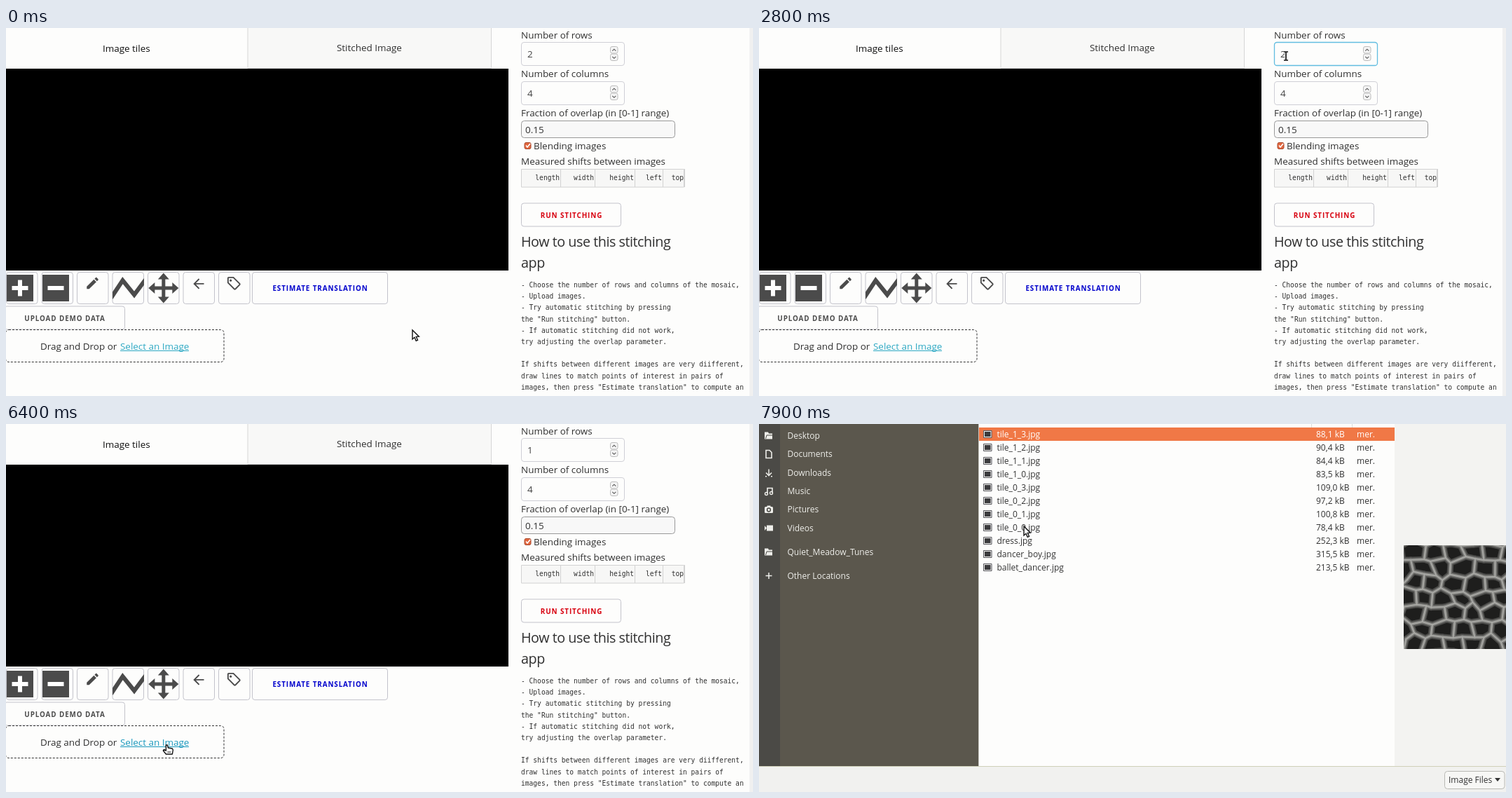
An HTML page with a canvas for the animation above (8000 ms loop, 1066 by 525 pixels).

```html
<!DOCTYPE html>
<html lang="en">
<head>
<meta charset="utf-8">
<title>Stitching app</title>
<style>
html, body { margin: 0; width: 100%; height: 100%; overflow: hidden; background: #fdfdfc; }
canvas { display: block; }
</style>
</head>
<body>
<canvas id="stage" width="1066" height="525"></canvas>
<script>
const LOOP = 8000, W = 1066, H = 525, DLG_TOP = -86;
const SANS = '"Open Sans", "Noto Sans", sans-serif';
const MONO = '"DejaVu Sans Mono", monospace';
const INK = '#303030', LINE = '#c3c3cb';
const stage = document.getElementById('stage').getContext('2d');
let c = stage;

// y is the middle of the capitals
function text(str, x, y, { size = 13.45, color = INK, weight = 400, font = SANS, align = 'left', gap = 0 } = {}) {
  c.font = `${weight} ${size}px ${font}`;
  c.letterSpacing = gap + 'px';
  c.textAlign = align;
  c.fillStyle = color;
  c.fillText(str, x, y + size * 0.36);
}
function rect(x, y, w, h, color) {
  c.fillStyle = color;
  c.fillRect(x, y, w, h);
}
function box(x, y, w, h, r, fill, stroke, width = 1) {
  c.beginPath();
  c.roundRect(x, y, w, h, r);
  if (fill) { c.fillStyle = fill; c.fill(); }
  if (stroke) { c.strokeStyle = stroke; c.lineWidth = width; c.stroke(); }
}
function lines(pts, color, width = 1, close = false, fill = null) {
  c.beginPath();
  pts.forEach(([x, y], i) => i ? c.lineTo(x, y) : c.moveTo(x, y));
  if (close) c.closePath();
  if (fill) { c.fillStyle = fill; c.fill(); }
  if (color) { c.strokeStyle = color; c.lineWidth = width; c.stroke(); }
}
function at(x, y, scale, draw) {
  c.save();
  c.translate(x, y);
  c.scale(scale, scale);
  draw();
  c.restore();
}
function disc(x, y, r, fill, stroke, width = 1) {
  c.beginPath();
  c.arc(x, y, r, 0, 7);
  if (fill) { c.fillStyle = fill; c.fill(); }
  if (stroke) { c.strokeStyle = stroke; c.lineWidth = width; c.stroke(); }
}

const PENCIL = new Path2D('M3 17.25V21h3.75L17.81 9.94l-3.75-3.75L3 17.25zM20.71 7.04c.39-.39.39-1.02 0-1.41l-2.34-2.34c-.39-.39-1.02-.39-1.41 0l-1.83 1.83 3.75 3.75 1.83-1.83z');
const BACK = new Path2D('M20 11H7.83l5.59-5.59L12 4l-8 8 8 8 1.41-1.41L7.83 13H20z');
const TAG = new Path2D('M3 4v7l9.5 9.5q.7.5 1.4 0l6.6-6.6q.5-.7 0-1.4L11 3H4q-1 0-1 1z');

function toolbar() {
  const dark = '#4b4b4b';
  for (let i = 0; i < 7; i++) box(0.5 + i * 50.5, 348.5, 44.5, 45, 3.6, '#fdfdfc', LINE);
  rect(1, 352, 38, 38, dark);
  rect(52, 352, 38, 38, dark);
  rect(8.5, 368, 23, 6, '#fff');
  rect(17, 359.5, 6, 23, '#fff');
  rect(59.5, 368, 23, 6, '#fff');
  c.fillStyle = dark;
  at(112.5, 353, 0.92, () => c.fill(PENCIL));
  at(263.5, 353.5, 0.95, () => c.fill(BACK));
  at(314, 353, 0.95, () => {
    c.strokeStyle = dark; c.lineWidth = 2; c.stroke(TAG);
    disc(7, 7.5, 1.6, dark);
  });
  c.save();
  c.beginPath(); c.rect(152, 349, 45, 44); c.clip();
  lines([[150, 385], [166.5, 360], [183, 380.5], [199, 359]], dark, 6);
  c.restore();
  // four-way arrow
  for (let i = 0; i < 4; i++) {
    c.save();
    c.translate(224.8, 371);
    c.rotate(i * Math.PI / 2);
    rect(-2.5, -16, 5, 16, dark);
    lines([[0, -21.5], [8, -12.5], [-8, -12.5]], null, 0, true, dark);
    c.restore();
  }
}
function button(label, x, y, w, h, color) {
  box(x, y, w, h, 3.6, '#fdfdfc', LINE);
  text(label, x + w / 2 + 0.5, y + h / 2 + 0.5, { size: 9.87, weight: 700, gap: 0.9, color, align: 'center' });
}
function numberField(value, y, focused) {
  box(735.5, y, 147, 33, 3.6, '#fdfdfc', focused ? '#62bde0' : '#cfcfd6', focused ? 1.3 : 1);
  text(value, 744, y + 17, { color: '#444' });
  for (const d of [0, 1]) {
    const top = y + 6 + d * 10.5, mid = top + 5;
    box(862.5, top, 10.5, 9.5, 2.5, '#f4f4f4', '#bcbcbc');
    const s = d ? -1 : 1;
    lines([[865.3, mid + s * 1.2], [867.8, mid - s * 1.3], [870.3, mid + s * 1.2]], '#555', 1.1);
  }
}

const HELP = [
  '- Choose the number of rows and columns of the mosaic,', '- Upload images.',
  '- Try automatic stitching by pressing', 'the "Run stitching" button.',
  '- If automatic stitching did not work,', 'try adjusting the overlap parameter.', '',
  'If shifts between different images are very diifferent,',
  'draw lines to match points of interest in pairs of',
  'images, then press "Estimate translation" to compute an'
];

function page(t) {
  rect(0, 0, W, H, '#fdfdfc');
  rect(1061, 0, 5, H, '#f0f0f0');

  rect(345, 0, 347, 57, '#f8f8f7');
  lines([[345, 0], [345, 57.5], [692.5, 57.5], [692.5, 0]], '#d6d6d6');
  text('Image tiles', 138, 29.5, { color: '#111' });
  text('Stitched Image', 472, 28.5);
  rect(0, 58, 717, 288, '#000');
  toolbar();
  button('ESTIMATE TRANSLATION', 351.5, 348.5, 193, 45, '#0000cc');
  button('UPLOAD DEMO DATA', -2.5, 397, 172, 33, '#4c4c4c');

  c.setLineDash([3, 2]);
  box(-0.5, 430.5, 311.5, 46, 4.5, '#fdfdfc', '#333');
  c.setLineDash([]);
  const link = t > 5750 ? '#1a98bd' : '#2ea9c4';
  text('Drag and Drop or', 49, 454);
  text('Select an Image', 163, 454, { color: link });
  rect(163, 460, 98, 1, link);

  const focused = t >= 2100 && t < 6200;
  text('Number of rows', 735, 10);
  numberField(t < 3000 ? '2' : '1', 20.5, focused);
  if (focused && (t - 2100) % 1200 < 650) rect(752, 28, 1.2, 18, '#111');
  text('Number of columns', 735, 65.5);
  numberField('4', 76.5, false);
  text('Fraction of overlap (in [0-1] range)', 735, 121.5);
  box(735.5, 132.5, 219, 24, 4, '#f8f8f8', '#999');
  text('0.15', 741, 145);

  box(740, 163.5, 9, 9, 2, '#e2673f', '#a8492c');
  lines([[742, 167.5], [744, 170], [748, 165]], '#fff', 1.6);
  text('Blending images', 753, 168.5);
  text('Measured shifts between images', 735, 190);

  rect(735, 201, 233, 26, '#f7f7f6');
  box(735.5, 201.5, 232, 25.5, 0, null, '#d2d2d2');
  [['length', 791], ['width', 840], ['height', 897], ['left', 937], ['top', 968]].forEach(([s, x]) => {
    lines([[x + 0.5, 201], [x + 0.5, 227]], '#d2d2d2');
    text(s, x - 1, 214, { size: 9.6, font: MONO, align: 'right' });
  });

  button('RUN STITCHING', 735.5, 250, 142, 33, '#d8000f');
  const head = { size: 19.73, gap: -0.45 };
  text('How to use this stitching', 735, 304.5, head);
  text('app', 735, 334.5, head);
  HELP.forEach((s, i) => text(s, 735, 366.5 + i * 16.22, { size: 9.6, font: MONO }));
}

function sideIcon(kind, y) {
  const ink = '#eeeeea';
  at(14, y, 1, () => {
    if (kind === 'folder') {
      lines([[-6, -5], [-1, -5], [0, -3], [5, -3], [5, 5], [-6, 5]], null, 0, true, ink);
      lines([[-4.5, 4.5], [-3, -0.5], [6, -0.5]], '#4b4a46');
    } else if (kind === 'clock') {
      disc(0, 0, 5, null, ink, 1.5);
      lines([[0, -3], [0, 0], [2.5, 0]], ink, 1.2);
    } else if (kind === 'home') home(ink);
    else if (kind === 'file') lines([[-4, -5.5], [1, -5.5], [4, -2.5], [4, 5.5], [-4, 5.5]], ink, 1.6, true);
    else if (kind === 'down') {
      lines([[0, -5], [0, 3]], ink, 1.5);
      lines([[-4, 0], [0, 4], [4, 0]], ink, 1.6);
      rect(-5, 4.5, 2, 1.5, ink); rect(3, 4.5, 2, 1.5, ink);
    } else if (kind === 'music') {
      lines([[-2, 3], [-2, -4.5], [5, -4.5], [5, 2]], ink, 1.6);
      disc(-3.5, 3.5, 2, null, ink, 1.4); disc(3.5, 2.5, 2, null, ink, 1.4);
    } else if (kind === 'camera') {
      box(-6, -4, 12, 9, 1.5, ink); rect(-2.5, -5.5, 5, 2, ink);
      disc(0, 0.5, 2.4, ink, '#4b4a46', 1.5);
    } else if (kind === 'video') {
      rect(-3, -4, 9, 8, ink);
      lines([[-6, -3.5], [-3, 0], [-6, 3.5]], null, 0, true, ink);
    } else {
      rect(-4.5, -0.75, 9, 1.5, ink); rect(-0.75, -4.5, 1.5, 9, ink);
    }
  });
}
function home(ink) {
  lines([[-6, 0], [0, -5.5], [6, 0]], ink, 1.6);
  lines([[-4, 0], [-4, 5], [-1, 5], [-1, 2], [1, 2], [1, 5], [4, 5], [4, 0], [0, -3.5]], null, 0, true, ink);
}

// Porous foam: a pale, uneven honeycomb over dark holes
function foam(x, y, w, h) {
  let seed = 11;
  const rnd = () => (seed = seed * 16807 % 2147483647) / 2147483647;
  const cols = 12, rows = 8, nodes = [];
  for (let r = 0; r < rows; r++) for (let k = 0; k < cols; k++) {
    nodes.push([x + k * 14 - 4 + rnd() * 9, y + r * 22 - 6 + rnd() * 10 + ((r + k) % 2 ? -3 : 3)]);
  }
  c.save();
  c.beginPath(); c.rect(x, y, w, h); c.clip();
  rect(x, y, w, h, '#1e1e1d');
  c.lineCap = 'round';
  for (const [color, width] of [['#4c4c4a', 9], ['#7d7d7a', 5], ['#a9a9a5', 1.8]]) {
    nodes.forEach((node, i) => {
      const r = Math.floor(i / cols), k = i % cols;
      if (k < cols - 1) lines([node, nodes[i + 1]], color, width);
      if ((r + k) % 2 === 0 && r < rows - 1) lines([node, nodes[i + cols]], color, width);
    });
  }
  c.restore();
}

const PLACES = [
  ['Recent', 'clock', -37], ['Home', 'home', -10], ['Desktop', 'folder', 16.5], ['Documents', 'file', 43],
  ['Downloads', 'down', 69.5], ['Music', 'music', 96], ['Pictures', 'camera', 122], ['Videos', 'video', 148.5],
  ['Quiet_Meadow_Tunes', 'folder', 182.5], ['Other Locations', 'plus', 216.5]
];
const FILES = [
  ['tile_1_3', '88,1'], ['tile_1_2', '90,4'], ['tile_1_1', '84,4'], ['tile_1_0', '83,5'],
  ['tile_0_3', '109,0'], ['tile_0_2', '97,2'], ['tile_0_1', '100,8'], ['tile_0_0', '78,4'],
  ['dress', '252,3'], ['dancer_boy', '315,5'], ['ballet_dancer', '213,5']
];

function makeDialog() {
  const layer = document.createElement('canvas');
  layer.width = W;
  layer.height = H - DLG_TOP;
  c = layer.getContext('2d');
  c.translate(0, -DLG_TOP);
  const small = { size: 12, color: '#333' }, pale = { size: 12, color: '#eeeeea' };

  rect(0, DLG_TOP, W, H - DLG_TOP, '#f3f3f1');
  const g = c.createLinearGradient(0, DLG_TOP, 0, -53);
  g.addColorStop(0, '#4b4a45'); g.addColorStop(1, '#383733');
  rect(0, DLG_TOP, W, 33, g);
  text('Cancel', 11, -69, pale);
  text('File Upload', 534, -69, { ...pale, weight: 700, align: 'center' });
  disc(991, -71, 4, null, '#eee', 1.5);
  lines([[994, -68], [998, -63]], '#eee', 1.8);
  box(1014, -82, 49, 26, 4, '#35ad58', '#2b8f48');
  text('Open', 1038.5, -69, { ...pale, align: 'center' });

  rect(0, -53, 30, 541, '#4b4a46');
  rect(30, -53, 283, 541, '#5b574d');
  for (const [name, icon, y] of PLACES) {
    sideIcon(icon, y);
    text(name, 40.5, y, pale);
  }

  // path bar
  box(318, -50, 358, 27, 4, '#f0f0ee', '#c4c4c0');
  rect(601, -49, 55, 25, '#d5d5d1');
  for (const x of [341, 403, 460, 512, 600, 656]) rect(x, -50, 1, 27, '#c8c8c4');
  lines([[330, -41], [325.5, -37], [330, -33]], null, 0, true, '#444');
  lines([[664, -41], [668.5, -37], [664, -33]], null, 0, true, '#888');
  at(352, -37, 1, () => home('#3b3b3b'));
  [['lena', 379.5], ['travail', 434], ['plotly', 488], ['dash-canvas', 557], ['assets', 628]]
    .forEach(([s, x]) => text(s, x, -37, { ...small, align: 'center' }));

  rect(314, -19, 593, 507, '#fdfdfc');
  rect(313, -53, 1, 541, '#c9c7c0');
  rect(788, -19, 1, 24, '#dcdcd8');
  rect(846, -19, 1, 24, '#dcdcd8');
  text('Name', 319, -7, small);
  text('Size', 795, -7, small);
  text('Modified', 852, -7, small);
  lines([[773, -9], [781, -9], [777, -5]], null, 0, true, '#555');
  rect(314, 5, 593, 19, '#f07846');
  FILES.forEach(([name, kb], i) => {
    const y = 15 + i * 19, style = i ? small : { ...small, color: '#fff' };
    box(320.5, y - 5.5, 11.5, 10, 0, '#f4f4f2', '#55555a');
    rect(322, y - 4, 8.5, 7, '#3a3a3c');
    text(name + '.jpg', 339.5, y, style);
    text(kb + ' kB', 795, y, style);
    text('mer.', 853, y, style);
  });

  text('tile_1_3.jpg', 993.5, -12, { ...small, align: 'center' });
  foam(920, 173, 146, 148);
  rect(0, 488, W, 37, '#f1f1ef');
  rect(0, 488, W, 1, '#cfd0b8');
  box(978.5, 495.5, 85.5, 25, 4, '#f7f7f5', '#b9b9b4');
  text('Image Files', 984, 508, small);
  lines([[1050, 505], [1058, 505], [1054, 510]], null, 0, true, '#333');
  c = stage;
  return layer;
}

const dialog = makeDialog();

// Shadow around the window only, so that its see-through inside stays clean
function shadow(top, height) {
  c.save();
  c.beginPath();
  c.rect(0, 0, W, H);
  c.rect(0, top, W, height);
  c.clip('evenodd');
  c.shadowColor = 'rgba(0,0,0,.5)';
  c.shadowBlur = 14;
  c.shadowOffsetY = 2;
  rect(-20, top, W + 40, height, '#000');
  c.restore();
}

// The window unfolds vertically about its middle while fading in
function showDialog(t) {
  const p = Math.min((t - 6406) / 250, 1);
  if (p <= 0) return;
  const s = 1 - (1 - p) * (1 - p), mid = 224;
  const top = mid + (DLG_TOP - mid) * s, height = dialog.height * s;
  c.save();
  c.globalAlpha = s;
  if (p < 1) shadow(top, height);
  c.drawImage(dialog, 0, top, W, height);
  c.restore();
}

const MOVES = [
  [0, 580, 431], [900, 580, 431], [1700, 787, 41], [2100, 787, 41], [2500, 752, 40], [3400, 752, 40],
  [3900, 746, 71], [4300, 738, 100], [5800, 231, 458], [6800, 230, 458], [7700, 378, 146], [LOOP, 378, 146]
];
function pointer(t) {
  const i = MOVES.findIndex(m => m[0] > t);
  const [t0, x0, y0] = MOVES[i - 1], [t1, x1, y1] = MOVES[i];
  const u = (t - t0) / (t1 - t0), e = u * u * (3 - 2 * u);
  return [x0 + (x1 - x0) * e, y0 + (y1 - y0) * e];
}
function cursor(t) {
  const [x, y] = pointer(t);
  const open = t > 6406;
  const inField = !open && x > 735 && x < 883 && ((y > 20 && y < 54) || (y > 76 && y < 110));
  const onLink = !open && x > 163 && x < 261 && y > 446 && y < 465;
  at(x, y, 1, () => {
    if (inField) {
      const bar = [[-3, -6], [3, -6], [0, -6], [0, 6], [-3, 6], [3, 6]];
      lines(bar, '#fff', 4);
      lines(bar, '#111', 1.7);
    } else if (onLink) {
      c.lineJoin = 'round';
      lines([[-2, 0], [0, 0], [1, 4], [7, 5], [8, 7], [7, 13], [-2, 13], [-6, 8], [-5, 6.5], [-2, 8]], '#111', 1.4, true, '#fff');
      lines([[0, 10], [5, 10]], '#111', 1);
      c.lineJoin = 'miter';
    } else {
      lines([[0, 0], [0, 13], [3, 10.3], [5.2, 15.3], [7.5, 14.3], [5.3, 9.4], [9.3, 9.2]], '#111', 1.4, true, '#fff');
    }
  });
}

function frame(now) {
  const t = now % LOOP;
  page(t);
  showDialog(t);
  cursor(t);
  requestAnimationFrame(frame);
}
requestAnimationFrame(frame);
</script>
</body>
</html>
```
